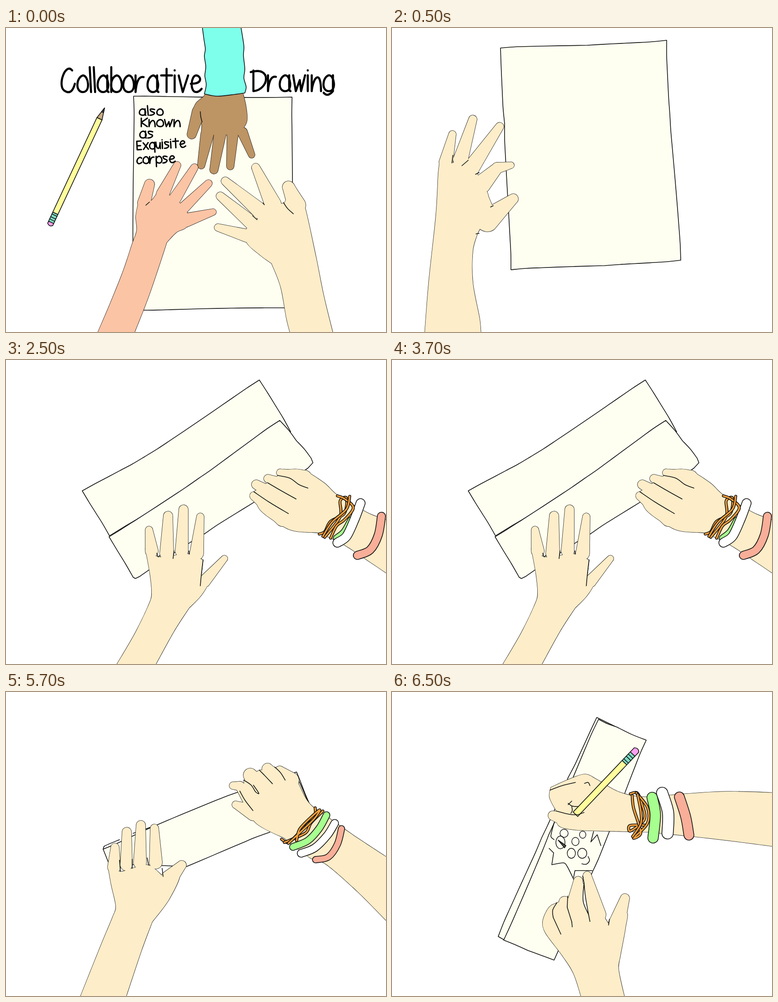
Animation, 837 px wide and 669 px high, one loop 8000 ms. Source, as an HTML page:

```html
<!DOCTYPE html>
<html lang="en">
<head>
<meta charset="utf-8">
<title>Collaborative Drawing</title>
<style>
  html, body { margin: 0; width: 100%; height: 100%; overflow: hidden; background: #fff; }
  svg { display: block; width: 100%; height: 100%; }
  path { stroke-linecap: round; stroke-linejoin: round; vector-effect: non-scaling-stroke; }
</style>
</head>
<body>
<svg id="stage" viewBox="0 0 837 669" role="img" aria-label="Collaborative Drawing, also known as exquisite corpse"></svg>
<script>
const NS = 'http://www.w3.org/2000/svg';
const stage = document.getElementById('stage');
const INK = '#111', PAPER = '#fffff1', SKIN = '#fdedc9', PEACH = '#fbc4a5', BROWN = '#bd9464';
const AQUA = '#7dffec', YELLOW = '#fffc9c', TEAL = '#7fdcc4', PINK = '#ff9ff0';
const GREEN = '#a6ff8f', CORAL = '#f8ae98', ORANGE = '#f5a03c';
const LINE = 1.6;
let layer;

const nums = text => text.trim().split(/\s+/).map(Number);
const pairs = text => {
  const n = nums(text);
  return n.filter((_, i) => i % 2 === 0).map((x, i) => [x, n[2 * i + 1]]);
};

// Smooth line through "x y x y"; "/" marks a sharp corner at the point before it.
function curve(text) {
  let last, d = '';
  for (const part of text.split('/')) {
    const pts = last ? [last, ...pairs(part)] : pairs(part);
    if (!last) d = 'M' + pts[0];
    const handle = (i, sign, len) => {
      const a = pts[Math.max(i - 1, 0)], b = pts[Math.min(i + 1, pts.length - 1)];
      const dx = b[0] - a[0], dy = b[1] - a[1];
      const k = sign * Math.min(1 / 6, .4 * len / (Math.hypot(dx, dy) || 1));
      return [pts[i][0] + dx * k, pts[i][1] + dy * k];
    };
    for (let i = 1; i < pts.length; i++) {
      const len = Math.hypot(pts[i][0] - pts[i - 1][0], pts[i][1] - pts[i - 1][1]);
      d += `C${handle(i - 1, 1, len)} ${handle(i, -1, len)} ${pts[i]}`;
    }
    last = pts[pts.length - 1];
  }
  return d;
}

function add(tag, attrs, parent = layer) {
  const el = document.createElementNS(NS, tag);
  for (const k in attrs) el.setAttribute(k, attrs[k]);
  parent.append(el);
  return el;
}
const draw = (d, fill, stroke = INK, width = LINE) => add('path', { d, fill, stroke, 'stroke-width': width });
const shape = (fill, pts) => draw(curve(pts) + 'Z', fill);
const line = (...list) => list.forEach(pts => draw(curve(pts), 'none'));
function band(color, width, pts) {
  draw(curve(pts), 'none', INK, width + LINE);
  draw(curve(pts), 'none', color, width - LINE);
}
const cord = pts => band(ORANGE, 5, pts);
const ring = (x, y, rx, ry) => add('ellipse', { cx: x, cy: y, rx, ry, fill: 'none', stroke: INK, 'stroke-width': 1.4 });

// Polygon whose edges waver a little, as if drawn by hand.
function sheet(corners) {
  const pts = pairs(corners);
  let seed = pts[0][0];
  const wave = () => Math.sin(++seed * 12.9) * 1.5;
  const edges = pts.map((a, i) => {
    const b = pts[(i + 1) % pts.length], dx = b[0] - a[0], dy = b[1] - a[1];
    const len = Math.hypot(dx, dy), steps = Math.ceil(len / 36);
    return Array.from({ length: steps }, (_, j) => {
      const f = (j + 1) / steps, off = j + 1 < steps ? wave() / len : 0;
      return `${a[0] + dx * f - dy * off} ${a[1] + dy * f + dx * off}`;
    }).join(' ');
  });
  shape(PAPER, pts[0].join(' ') + ' / ' + edges.join(' / '));
}

// Tapered tubes through circles "x y r x y r".
function finger(text) {
  const n = nums(text), tubes = [];
  for (let i = 0; i + 5 < n.length; i += 3) {
    const [x, y, r, X, Y, R] = n.slice(i, i + 6), len = Math.hypot(X - x, Y - y);
    const nx = (Y - y) / len, ny = (x - X) / len;
    tubes.push(`M${x + nx * r} ${y + ny * r}L${X + nx * R} ${Y + ny * R}A${R} ${R} 0 0 1 ${X - nx * R} ${Y - ny * R}` +
      `L${x - nx * r} ${y - ny * r}A${r} ${r} 0 0 1 ${x + nx * r} ${y + ny * r}Z`);
  }
  return tubes;
}
// Palm and fingers joined under one outline.
function hand(fill, palm, ...fingers) {
  const parts = [curve(palm) + 'Z', ...fingers.flatMap(finger)];
  parts.forEach(d => draw(d, INK, INK, LINE));
  parts.forEach(d => draw(d, fill, fill, .1));
}

// Runs from the eraser at (x, y) to (X, Y).
function pencil(x, y, X, Y, half, rubber, cap, tip) {
  const len = Math.hypot(X - x, Y - y), page = layer;
  const angle = Math.atan2(Y - y, X - x) * 180 / Math.PI;
  layer = add('g', { transform: `translate(${x} ${y}) rotate(${angle})` });
  const box = (fill, a, b) => draw(`M${a} ${-half}H${b}V${half}H${a}Z`, fill);
  box(YELLOW, cap, len - tip);
  if (tip) {
    const cone = (fill, size) => draw(`M${len} 0L${len - size} ${-half * size / tip}V${half * size / tip}Z`, fill);
    cone('#c9ad83', tip);
    cone('#4b4641', tip / 2.5);
  }
  box(TEAL, rubber, cap);
  for (const f of [.25, .5, .8]) {
    const at = rubber + (cap - rubber) * f;
    draw(`M${at} ${-half}V${half}`, 'none');
  }
  draw(`M${rubber} ${-half}H${half / 2}Q${-half / 2} 0 ${half / 2} ${half}H${rubber}Z`, PINK);
  layer = page;
}

// Hand lettering: x-height is 10, baseline 0.
const BOWL = 'M4 -10C-1 -9 -2 0 4 0S8 -10 4 -10', STEM = 'M0 -10V0', TAIL = 'M7 -10V';
const GLYPHS = {
  C: 'M8 -13C3 -18 -3 -4 2 -1S9 -2 10 -5',
  D: 'M1 -13V0M-1 -12C15 -16 13 -1 1 0',
  E: 'M6 -13H0V0H6M0 -6H5',
  K: 'M0 -12V0M7 -12L0 -6 7 0',
  a: BOWL + TAIL + '-3Q7 0 8 0',
  b: BOWL + 'M0 -15V0',
  c: 'M7 -8C3 -13 -3 -2 3 0Q5 0 7 -2',
  e: 'M0 -5C10 -5 7 -10 4 -10C0 -10 -1 0 4 0Q6 0 8 -2',
  g: BOWL + TAIL + '0Q3 4 0 1',
  i: STEM + 'M0 -13v-.1',
  l: 'M0 -15L1 0',
  n: STEM + 'C1 -9 7 -14 7 0',
  o: BOWL,
  p: BOWL + STEM + 'V5',
  q: BOWL + TAIL + '5',
  r: STEM + 'Q1 -10 6 -9',
  s: 'M6 -9C-2 -12 0 -6 4 -5S5 0 0 0',
  t: 'M4 -14V0M0 -10H8',
  u: 'M0 -10C0 2 5 3 6 -9V0',
  v: 'M0 -10L3 0 7 -10',
  w: 'M0 -10L2 0 5 -7 6 0 9 -10',
  x: STEM.replace('V', 'L7 ') + 'M7 -10L0 0'
};
const advance = ch => 2 + ('il'.includes(ch) ? 1 : 'CD'.includes(ch) ? 10 : ch === 'w' ? 9 : 'aet'.includes(ch) ? 8 : 7);
function letter(word, x, y, sx, sy, width, tilt = 0) {
  const page = layer;
  layer = add('g', { transform: `translate(${x} ${y}) rotate(${tilt}) scale(${sx} ${sy})` });
  let left = 0;
  for (const ch of word) {
    draw(GLYPHS[ch], 'none', '#000', width).setAttribute('transform', `translate(${left} 0)`);
    left += advance(ch);
  }
  layer = page;
}

function table() {
  sheet('281 150 630 152 629 616 303 621 281 600');
  letter('Collaborative', 122, 141, 2.97, 3.66, 4.6);
  letter('Drawing', 542, 139, 2.92, 3.5, 4.6);
  letter('also', 294, 192, 1.75, 1.4, 3);
  letter('Known', 298, 217, 1.9, 1.55, 3);
  letter('as', 295, 242, 1.75, 1.5, 3);
  letter('Exquisite', 289, 268, 1.55, 1.45, 3, -3);
  letter('corpse', 288, 299, 1.6, 1.5, 3, -2);
  hand(BROWN, '440 140 437 149 419 165 411 182 / 430 205 430 235 / 512 235 / 530 207 529 175 521 140',
    '424 185 14 409 234 10', '443 235 14 430 302 8', '471 236 13 458 312 9', '499 236 12 494 304 8', '521 230 11 541 279 7');
  line('432 207 429 195 428 184');
  shape(AQUA, '432 -5 436 25 439 46 437 62 440 85 438 105 441 125 437 145 / 465 150 505 146 526 143 / 529 130 524 110 526 90 523 60 524 40 517 -5');
  hand(PEACH, '200 675 230 605 258 535 278 475 288 445 286 415 291 387 / 316 383 331 366 / 360 368 383 385 399 406 / 398 437 375 450 354 472 / 340 515 318 580 303 620 281 675',
    '304 385 14 316 344 11', '345 366 14 377 302 8', '373 374 13 415 307 8', '392 395 12 446 342 8', '396 423 15 456 405 7');
  line('316 383 308 390');
  hand(SKIN, '721 675 700 590 683 505 660 400 648 370 633 342 / 613 386 / 569 389 / 553 422 530 441 / 530 472 560 500 585 518 / 605 570 618 640 627 675',
    '640 390 20 622 350 13', '588 388 18 550 307 9', '560 403 17 483 337 9', '540 428 15 472 370 9', '530 457 14 467 439 8');
  line('611 384 620 397 633 409', '569 389 566 385', '553 422 543 413');
  pencil(96, 435, 217, 176, 6.2, 8, 30, 26);
}

function blankSheet() {
  sheet('239 44 430 38 605 27 612 190 636 511 468 523 262 532 248 210');
  hand(SKIN, '72 675 81 560 97 410 102 320 105 295 / 132 297 / 165 292 188 321 / 210 362 213 372 221 391 / 188 453 / 178 490 178 560 193 640 196 675',
    '119 295 15 133 234 8', '151 290 16 178 201 9', '172 312 18 237 217 9', '198 343 20 232 308 12 262 302 7', '210 423 25 267 376 11');
  line('132 297 134 280', '154 303 168 291', '184 322 192 318', '217 394 223 391', '192 452 185 453');
}

function firstFold() {
  sheet('168 288 305 213 558 44 627 158 228 387');
  sheet('227 389 425 260 603 133 640 178 672 216 676 226 665 238 438 382 295 476 285 481 280 478');
  hand(SKIN, '241 675 285 600 318 530 321 510 317 470 307 415 / 335 433 370 430 402 427 434 440 / 430 475 / 445 490 430 518 403 546 / 370 597 327 675',
    '321 420 14 315 374 8', '354 425 15 357 343 10', '387 420 14 391 329 10', '420 425 15 428 345 8', '437 487 13 481 437 7');
  line('434 440 430 475 428 497', '370 420 368 437', '403 420 403 427', '332 425 335 433 339 430');
  hand(SKIN, '850 355 800 338 731 298 700 270 655 243 620 241 / 576 270 / 546 290 / 560 330 612 367 640 377 690 380 / 745 407 795 440 850 477',
    '655 262 20 604 248 8', '640 288 20 577 261 9', '620 312 16 551 274 10', '610 348 18 546 299 9');
  line('598 254 625 260 645 274 665 282', '576 270 605 287 639 306', '546 290 580 313 622 338');
  band(GREEN, 14, '728 392 745 378 760 352');
  band('#fff', 20, '730 402 750 388 768 350 781 315');
  cord('690 383 702 378 715 355 745 338 750 304 736 310 736 345 702 390');
  cord('730 299 745 305 765 325 745 352 728 365 715 392');
  cord('757 300 750 328 718 357 698 388');
  band(CORAL, 18, '774 430 802 418 820 385 827 344');
}

function secondFold() {
  sheet('214 346 336 291 515 219 640 176 668 245 580 309 398 384 226 376');
  line('214 346 217 339 250 325', '280 311 320 297', '638 180 632 182 645 196 666 243');
  hand(SKIN, '162 675 208 560 235 495 242 472 232 425 225 385 / 252 395 278 388 314 381 346 406 / 383 400 360 455 322 506 / 298 570 263 675',
    '238 385 14 240 342 9', '265 380 13 266 308 10', '295 375 14 297 293 10', '330 375 14 327 300 9', '360 410 18 387 381 10');
  line('250 370 252 395', '278 368 278 388', '311 365 314 381', '344 388 346 406');
  hand(SKIN, '850 371 775 322 715 280 668 245 640 195 615 168 / 558 172 / 524 194 / 527 240 / 550 288 612 321 / 670 365 705 379 775 440 850 516',
    '625 195 20 603 174 11', '605 200 18 576 169 12', '565 210 18 538 183 15', '540 235 20 515 207 10 500 206 8', '545 265 18 506 248 8');
  line('524 194 540 205 550 220 557 223 545 205', '515 218 527 239 544 261', '558 172 570 184 587 202', '592 165 605 178 615 194');
  cord('607 324 622 331 645 310 660 288 680 272 681 255');
  cord('613 331 660 310 672 288 698 262');
  cord('640 327 648 300 690 260 678 280 622 333');
  band(GREEN, 15, '632 341 665 327 690 300 706 271');
  band('#fff', 17, '650 355 680 343 708 315 724 289');
  band(CORAL, 14, '682 369 710 363 730 335 739 301');
}

function drawing() {
  sheet('451 56 492 76 400 300 246 545 234 538 330 320 388 188');
  sheet('455 60 495 77 560 106 513 222 441 397 357 590 300 569 246 546 345 315');
  line('358 285 350 317 357 325', '346 344 356 354 / 352 380 / 378 376 386 384 400 412', '400 408 403 393 / 441 393',
    '418 378 428 379 435 371 432 362', '444 307 438 330 / 452 314 / 460 338');
  ring(379, 311, 9, 9);
  ring(371, 331, 10, 14);
  ring(404, 329, 8, 9);
  ring(395, 355, 9, 11);
  ring(419, 355, 10, 11);
  ring(420, 314, 7, 8);
  shape('#55544c', '366 326 / 383 338 / 380 343 / 366 326');
  hand(SKIN, '850 222 740 219 648 224 555 231 500 220 450 192 425 181 390 192 350 210 / 347 232 362 262 / 366 293 400 303 470 306 565 308 / 664 318 750 328 850 341',
    '390 282 18 354 272 10');
  pencil(541, 125, 404, 269, 7, 16, 42, 0);
  line('348 216 375 206 404 199', '424 201 432 199 436 206', '396 240 388 248', '388 245 397 251 410 252', '396 252 397 261 394 267', '362 262 390 269 408 270 423 265');
  cord('525 224 540 222 550 245 556 280 525 306 524 294 558 293');
  cord('529 228 532 255 548 310 532 321 562 290 563 255 538 222');
  cord('541 226 548 262 548 290 530 318');
  band(GREEN, 23, '573 232 580 270 575 321');
  band('#fff', 25, '595 222 608 265 607 311');
  band(CORAL, 22, '633 231 647 275 654 315');
  hand(SKIN, '418 675 400 620 375 580 338 530 332 505 345 475 363 464 / 388 455 / 420 420 / 477 510 / 516 485 514 520 503 580 499 610 513 675',
    '360 500 20 358 478 11', '378 500 22 380 462 12', '405 460 18 410 416 10', '452 490 19 430 404 9', '495 510 18 513 454 10');
  shape('#fff', '423 420 426 450 433 490 / 421 460 423 420');
  shape('#fff', '386 474 396 506 / 386 474');
  shape('#fff', '355 496 372 533 / 355 496');
  line('420 405 423 420', '433 490 436 505', '387 449 386 474', '396 506 397 517', '363 464 354 480 355 496', '479 500 477 513');
}

const SCENES = [[0, table], [500, blankSheet], [2500, firstFold], [4500, secondFold], [6500, drawing]];
const LOOP = 8000;
const layers = SCENES.map(([, paint]) => {
  const page = layer = add('g', {}, stage);
  paint();
  return page;
});

function tick() {
  const t = performance.now() % LOOP;
  const current = SCENES.filter(([start]) => start <= t).length - 1;
  layers.forEach((g, i) => g.setAttribute('display', i === current ? 'inline' : 'none'));
  requestAnimationFrame(tick);
}
tick();
</script>
</body>
</html>
```
